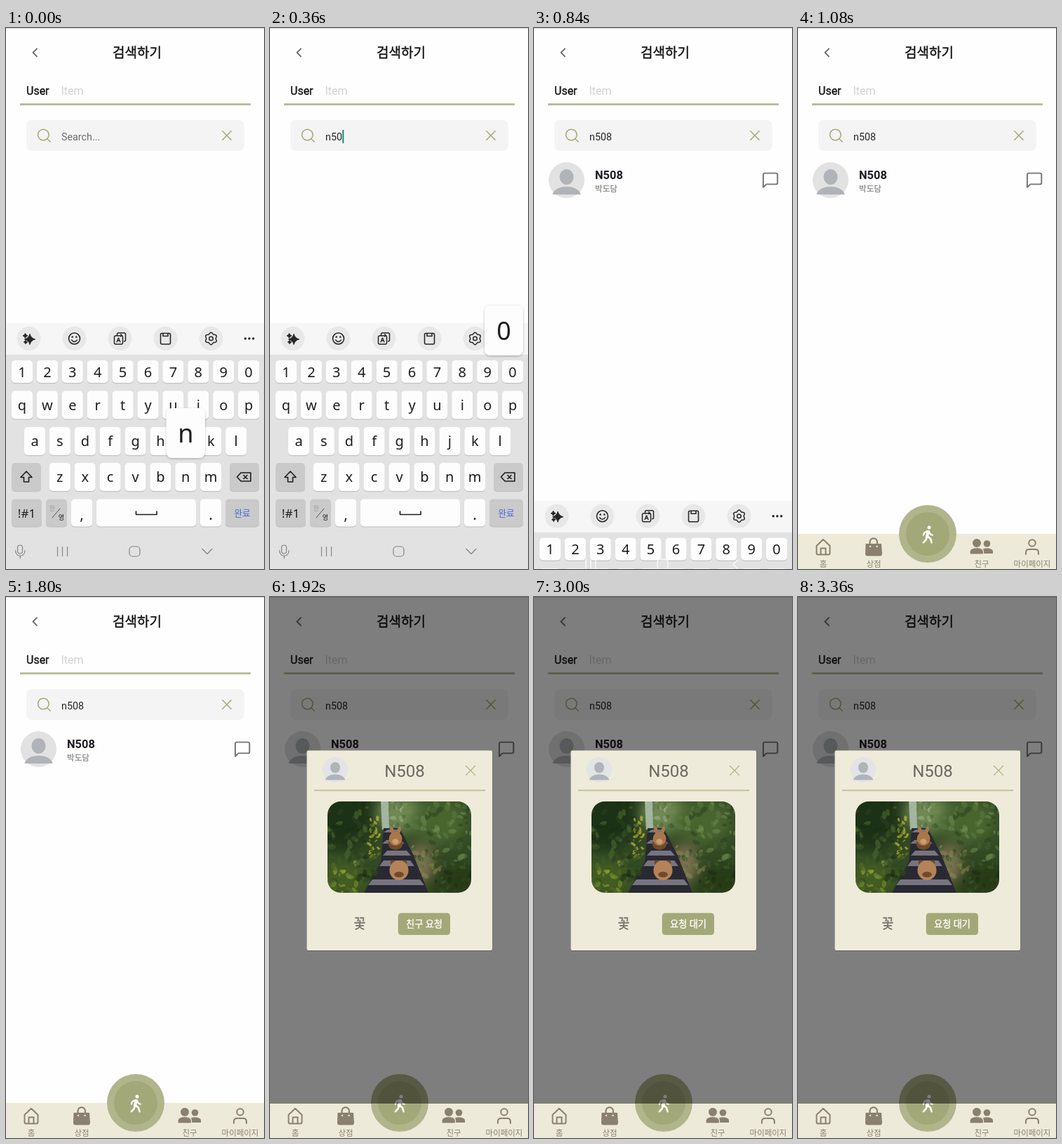
These frames come from a looping animation (368x770 px, 3600 ms). An HTML page:

```html
<!DOCTYPE html>
<html lang="ko">
<head>
<meta charset="utf-8">
<title>검색하기</title>
<style>
  html, body { margin: 0; width: 100%; height: 100%; overflow: hidden; background: #fefefe; }
  svg { display: block; width: 100%; height: 100%; }
  text { font-family: Roboto, "Noto Sans CJK KR", "Noto Sans CJK", sans-serif; }
  .key { font-family: "Noto Sans", "Noto Sans CJK KR", "Noto Sans CJK", sans-serif; }
</style>
</head>
<body>
<svg id="stage" viewBox="0 0 368 770" xmlns="http://www.w3.org/2000/svg"></svg>
<script>
const LOOP = 3600, STEP = 120;
const ID = 'n508', NAME = 'N508', REAL = '박도담';
const OLIVE = '#a3a878', CREAM = '#eeead9', TAUPE = '#8a8070';

// Markup helpers
const rect = (x, y, w, h, r, fill, more = '') =>
  `<rect x="${x}" y="${y}" width="${w}" height="${h}" rx="${r}" fill="${fill}" ${more}/>`;
const circle = (x, y, r, fill, more = '') => `<circle cx="${x}" cy="${y}" r="${r}" fill="${fill}" ${more}/>`;
const oval = (x, y, rx, ry, fill, more = '') =>
  `<ellipse cx="${x}" cy="${y}" rx="${rx}" ry="${ry}" fill="${fill}" ${more}/>`;
const shape = (d, fill, more = '') => `<path d="${d}" fill="${fill}" ${more}/>`;
const line = (d, color, w, more = '') =>
  `<path d="${d}" fill="none" stroke="${color}" stroke-width="${w}" stroke-linecap="round" stroke-linejoin="round" ${more}/>`;
const text = (x, y, size, fill, str, more = '') =>
  `<text x="${x}" y="${y}" font-size="${size}" fill="${fill}" ${more}>${str}</text>`;
const label = (x, y, size, fill, str, more = '') =>
  text(x, y, size, fill, str, 'text-anchor="middle" ' + more);
const group = (id, body, more = '') => `<g id="${id}" ${more}>${body}</g>`;
const medium = color => `stroke="${color}" stroke-width=".35"`;
const cross = (x, y, r, color, w) =>
  line(`M${x - r} ${y - r}l${2 * r} ${2 * r}m0 ${-2 * r}l${-2 * r} ${2 * r}`, color, w);

function random(seed) {
  return () => (seed = (seed * 16807) % 2147483647) / 2147483647;
}

function avatar(x, y, r, back, front) {
  const k = r / 25.5;
  return `<g transform="translate(${x} ${y}) scale(${k})">` + circle(0, 0, 25.5, back) +
    oval(0, -4.5, 10, 11, front) + shape('M-20 20.5C-17 5.5 17 5.5 20 20.5Z', front) + '</g>';
}

function page() {
  return rect(0, 0, 368, 770, 0, '#fefefe') + rect(0, 0, 368, 1, 0, '#d2d2d2') +
    line('M44 29.5L38.5 35L44 40.5', '#6e6e6e', 1.8) +
    label(187, 42, 19, '#111', '검색하기', medium('#111')) +
    text(29, 95, 16, '#141414', 'User', medium('#141414')) +
    text(78.5, 95, 16, '#d2d2d2', 'Item') +
    rect(20, 107.3, 329, 2.8, 0, '#b7ba95') +
    rect(29, 131, 311, 44, 8, '#f4f4f4') +
    circle(53.3, 152, 7.8, 'none', 'stroke="#a9a876" stroke-width="1.6"') +
    line('M59 158L63.2 162', '#a9a876', 1.6) + cross(315, 153, 6.2, '#a9a876', 1.5) +
    text(79, 160, 14.3, '#6c6c6c', '', 'id="query"') +
    rect(103.5, 145, 2, 19, 0, '#16897b', 'id="caret"');
}

const result = () => group('result',
  avatar(46.5, 216.5, 25.5, '#e2e2e2', '#b0b3b8') +
  text(87, 215, 16.4, '#1f1a24', NAME, 'font-weight="700"') +
  text(87, 232.5, 11.6, '#9a9a9a', REAL, 'font-weight="700"') +
  line('M21 15a2 2 0 0 1-2 2H7l-4 4V5a2 2 0 0 1 2-2h14a2 2 0 0 1 2 2z', '#747474', 1.7,
    'transform="translate(323.6 203.2) scale(1.13)"'));

function tabBar() {
  const names = [[36, '홈'], [108, '상점'], [262, '친구'], [334, '마이페이지']];
  const walker = circle(187, 711, 2.5, '#fff') +
    line('M185.5 717L184 724', '#fff', 4.2) +
    line('M183.8 724.5L182.5 728.5L178.8 732.3M185 723.5L189 727L190.6 732.3', '#fff', 2.6) +
    line('M184.5 716L180.4 718L178.8 721.8M186.8 716.5L188.8 720.4L191.8 721.8', '#fff', 2.2);
  return group('tabs',
    rect(0, 720, 368, 50, 0, CREAM) +
    circle(185, 720, 41, '#b1b58b') + circle(185, 720, 31, OLIVE) + walker +
    line('M26.5 737L36 728L45.5 737V747.5Q45.5 749.5 43.5 749.5H28.5Q26.5 749.5 26.5 747.5ZM32.5 749V740.5H39.5V749', TAUPE, 2) +
    shape('M96.5 734H119L120 748Q120 751.5 117 751.5H99Q96 751.5 96 748Z', TAUPE) +
    line('M102.5 737V732C102.5 724.5 113 724.5 113 732V737', TAUPE, 2.2) +
    circle(103, 738, 1.2, CREAM) + circle(112.6, 738, 1.2, CREAM) +
    circle(269.5, 734, 4.8, TAUPE) + shape('M261 748V745C261 739 278 739 278 745V748Z', TAUPE) +
    shape('M245 749V745C245 738 264.5 738 264.5 745V749Z', TAUPE, `stroke="${CREAM}" stroke-width="1.2"`) +
    circle(255, 733, 6, TAUPE) +
    circle(334, 733, 4.8, 'none', `stroke="${TAUPE}" stroke-width="2"`) +
    line('M325 749V746.5Q325 742 329.5 742H338.5Q343 742 343 746.5V749', TAUPE, 2) +
    names.map(([x, s]) => label(x, 766.5, 11.5, TAUPE, s)).join(''));
}

// Keyboard
const pitch = 35.9, keys = {};
const rows = [['1234567890', 23, 473, 32], ['qwertyuiop', 23, 516.5, 40], ['asdfghjkl', 41, 568, 40], ['zxcvbnm', 76.8, 619, 40]];

function cap(x, y, w, h, fill = '#fdfdfd') {
  return rect(x, y + 1.3, w, h, 5, '#c3c3c5') + rect(x, y, w, h, 5, fill);
}

function toolIcons() {
  const ink = '#262626', at = (x, s) => `<g transform="translate(${x} 442)">${s}</g>`;
  const star = (x, y, r) => shape(`M${x} ${y - r}Q${x + r * .2} ${y - r * .2} ${x + r} ${y}Q${x + r * .2} ${y + r * .2} ${x} ${y + r}Q${x - r * .2} ${y + r * .2} ${x - r} ${y}Q${x - r * .2} ${y - r * .2} ${x} ${y - r}Z`, ink, `stroke="${ink}"`);
  let gear = '';
  for (let i = 0; i < 48; i++) {
    const a = i / 48 * Math.PI * 2, r = 7.7 + Math.cos(a * 6);
    gear += (i ? 'L' : 'M') + (r * Math.sin(a)).toFixed(2) + ' ' + (-r * Math.cos(a)).toFixed(2);
  }
  return [
    star(1.5, 1, 7.5) + star(-5, -4, 3.5) + star(-4.5, 5, 2.8),
    circle(0, 0, 8, 'none', `stroke="${ink}" stroke-width="1.6"`) + circle(-2.8, -2.2, 1.3, ink) +
      circle(2.8, -2.2, 1.3, ink) + line('M-4 2Q0 7 4 2', ink, 1.5),
    line('M-4-4V-6Q-4-8-2-8H6Q8-8 8-6V2Q8 4 6 4', ink, 1.5) + rect(-8, -4, 12, 12, 2, 'none', `stroke="${ink}" stroke-width="1.5"`) +
      line('M-4.5 5L-2-1L.5 5M-3.8 3H-.2M1-6L3-4.5L1-3', ink, 1.3),
    rect(-7, -7.5, 14, 15.5, 2, 'none', `stroke="${ink}" stroke-width="1.6"`) + line('M-3.5-7V-3.5H3.5V-7', ink, 1.6),
    line(gear + 'Z', ink, 1.5) + circle(0, 0, 2.8, 'none', `stroke="${ink}" stroke-width="1.5"`)
  ].map((s, i) => at(32.5 + 65 * i, circle(0, 0, 17, '#e8e8e8') + s)).join('') +
    [341.3, 347, 352.7].map(x => circle(x, 442, 1.7, ink)).join('');
}

function keyboard() {
  const ink = '#1d1d1d', grey = '#cacaca', nav = '#85858a', k = 'class="key"';
  let s = rect(0, 420, 368, 46, 0, '#f6f6f6') + rect(0, 465, 368, 305, 0, '#e2e2e2') + toolIcons();
  for (const [chars, x0, y, h] of rows)
    [...chars].forEach((c, i) => {
      const x = x0 + i * pitch;
      keys[c] = { x, y };
      s += cap(x - 15, y, 30, h) + label(x, y + h / 2 + (h < 40 ? 7.5 : 7), 20, ink, c, k);
    });
  s += cap(8, 619, 42, 40, grey) + cap(319, 619, 42, 40, grey) + cap(8, 670.5, 43, 39, grey) + cap(57, 670.5, 30, 39, grey) +
    cap(93, 670.5, 30, 39) + cap(129, 670.5, 142, 39) + cap(277, 670.5, 30, 39) + cap(313, 670.5, 48, 39, grey);
  s += line('M29 631L37 639.5H32.5V646H25.5V639.5H21Z', ink, 1.6) +
    line('M329.5 639L335 633H349V645H335ZM339 636.5l5 5m0-5l-5 5', ink, 1.6) +
    label(29.5, 697, 17, ink, '!#1', k) + label(66, 687, 9, '#999', '한') + label(79, 700, 9, ink, '영') +
    line('M66 697L77 684', '#555', 1) + label(108, 700, 21, ink, ',', k) + label(292, 700, 21, ink, '.', k) +
    line('M185.5 688V692.5H215V688', ink, 1.6) + label(337, 695, 12.6, '#4668d8', '완료');
  s += rect(16.5, 736, 7, 12, 3.5, 'none', `stroke="${nav}" stroke-width="1.2"`) +
    line('M13.5 743.5C13.5 754 27 754 27 743.5M20.2 751.5V755', nav, 1.2);
  return group('keyboard', s + group('keyNav',
    line('M73.5 738.5V751.5M80.5 738.5V751.5M87.5 738.5V751.5', nav, 1.2) +
    rect(176, 738, 15, 14, 4.5, 'none', `stroke="${nav}" stroke-width="1.2"`) +
    line('M280 741.5L287 748.5L294 741.5', nav, 1.3)));
}

const popup = () => group('popup',
  rect(-27.5, -78, 55, 71, 8, '#fdfdfd', 'filter="url(#soft)"') +
  label(0, -29, 36, '#1d1d1d', '', 'class="key" id="popChar"'));

const homeNav = () => group('homeNav',
  line('M74 756V770M81 756V770M88 756V770M291 757L284 763.5L291 770', '#fafafa', 1.3) +
  rect(176, 756, 15, 14, 4.5, 'none', 'stroke="#fafafa" stroke-width="1.3"'));

// Garden path, painted with soft flat shapes in a 205 x 130 box
function photo() {
  const rnd = random(77);
  const leaves = (n, x, y, w, h, size, tones) => {
    let s = '';
    for (let i = 0; i < n; i++) {
      const px = (x + rnd() * w).toFixed(1), py = (y + rnd() * h).toFixed(1), r = size * (.5 + rnd());
      s += oval(px, py, r.toFixed(1), (r * .55).toFixed(1), tones[Math.floor(rnd() * tones.length)],
        `opacity=".6" transform="rotate(${Math.floor(rnd() * 180)} ${px} ${py})"`);
    }
    return s;
  };
  const glow = (x, y, rx, ry, color) => oval(x, y, rx, ry, color, 'filter="url(#haze)"');

  const woods = rect(0, 0, 205, 130, 0, '#334a25') +
    glow(20, 20, 48, 50, '#1f3217') + glow(104, 18, 34, 26, '#6f8852') + glow(160, 30, 40, 30, '#48652f') +
    glow(185, 112, 45, 25, '#263a19') + glow(22, 108, 36, 24, '#425c22') + glow(134, 88, 19, 28, '#7b7150') +
    leaves(70, -5, -5, 78, 95, 5, ['#1b2d13', '#2a401c', '#3c5728', '#4a6830']) +
    leaves(80, 112, -5, 98, 90, 5, ['#2c4520', '#425f2d', '#587840', '#6b874c']) +
    leaves(22, 82, -4, 34, 42, 4, ['#4c6738', '#7e9863', '#9fb386']) +
    shape('M76 0H87L88 40H78Z', '#a3b5a0') +
    leaves(30, 118, 62, 42, 46, 4, ['#8c7f5b', '#665d40', '#5b6d3a', '#75804a']) +
    leaves(24, 150, 88, 58, 44, 5, ['#1b2b12', '#2e4720', '#40592b']);

  let steps = shape('M80 38H103L122 75L144 130H52L76 86Z', '#292a31');
  for (const [x, y, w, h] of [[80, 40, 25, 4], [78, 55, 32, 5], [79, 70, 40, 7], [74, 84, 50, 8], [58, 111, 80, 8]])
    steps += shape(`M${x} ${y + h}L${x + 6} ${y}H${x + w - 6}L${x + w} ${y + h}Z`, '#777582');

  const flowers =
    leaves(36, 58, 24, 17, 58, 2.6, ['#c8b92d', '#9da02f', '#63782b', '#d9c941']) +
    leaves(34, -4, 88, 46, 44, 4, ['#748f2c', '#98a637', '#4e6d25', '#2f481a']) +
    leaves(24, 42, 78, 28, 34, 4, ['#1c2b14', '#2f461f', '#47602b']);

  const fur = '#a9774a', deep = '#6f4a2c';
  const pets = oval(92, 41, 2.6, 6, fur, 'transform="rotate(-15 92 41)"') +
    oval(102, 41, 2.6, 6, fur, 'transform="rotate(15 102 41)"') +
    oval(97, 60, 10.5, 9, deep) + oval(97, 53, 9.5, 10, fur) + oval(97, 57, 4.5, 4, '#c99f72') +
    circle(93, 87, 3.5, deep) + circle(110, 87, 3.5, deep) +
    oval(102, 98, 13.5, 14, '#b5835a') + oval(102, 104, 7, 4, deep);

  return `<g transform="translate(82 291)" clip-path="url(#frame)"><g filter="url(#blur)">` +
    woods + steps + flowers + '</g>' + pets + '</g>';
}

const modal = () => group('modal',
  rect(0, 0, 368, 721, 0, '#000', 'opacity=".5"') +
  rect(52.5, 219.5, 264.5, 284.5, 2, '#4c4c46', 'opacity=".6"') + rect(52.5, 218.5, 264.5, 284.5, 2, '#efebda') +
  avatar(93, 246, 18, '#e3e4e6', '#b1b3bb') +
  label(192, 256, 24, '#6c6961', NAME) + cross(286, 247, 6.5, '#b7af86', 1.2) +
  rect(63, 274.4, 244, 1.8, 0, '#c3bc93') + photo() +
  label(128, 472, 19, '#77736b', '꽃', medium('#77736b')) +
  group('button', rect(182.7, 449.8, 74.3, 31.2, 4.5, OLIVE) +
    label(220, 469.5, 13.2, '#fff', '', 'id="action" ' + medium('#fff'))));

const stage = document.getElementById('stage');
stage.innerHTML = `<defs><clipPath id="frame"><rect width="205" height="130" rx="19"/></clipPath>
  <filter id="blur"><feGaussianBlur stdDeviation=".7"/></filter>
  <filter id="haze" x="-50%" y="-50%" width="200%" height="200%"><feGaussianBlur stdDeviation="9"/></filter>
  <filter id="soft" x="-20%" y="-20%" width="140%" height="140%"><feDropShadow dx="0" dy="1" stdDeviation="1.6" flood-opacity=".28"/></filter></defs>` +
  page() + result() + tabBar() + keyboard() + popup() + homeNav() + modal();

const el = id => document.getElementById(id);
const show = (id, on) => el(id).setAttribute('display', on ? 'inline' : 'none');
const smooth = p => (p = Math.min(1, Math.max(0, p)), p * p * (3 - 2 * p));

function draw(time) {
  const t = Math.floor((time % LOOP) / STEP) * STEP;

  const typed = ID.slice(0, Math.min(4, t / STEP));
  el('query').textContent = typed || 'Search...';
  el('query').setAttribute('fill', typed ? '#262626' : '#6c6c6c');
  show('caret', typed && t < 720);
  el('caret').setAttribute('x', 79 + 8.1 * typed.length);

  const pressed = t === 0 ? ID[0] : t > STEP && t < 600 ? typed.slice(-1) : '';
  show('popup', pressed);
  if (pressed) {
    const { x, y } = keys[pressed];
    el('popChar').textContent = pressed;
    el('popup').setAttribute('transform', `translate(${Math.min(333.5, x)} ${y})`);
  }

  const drop = 350 * smooth((t - 620) / 337);
  el('keyboard').setAttribute('transform', `translate(0 ${drop})`);
  show('keyboard', drop < 350);
  show('homeNav', drop > 0 && drop < 350);
  show('keyNav', drop === 0);

  show('result', t >= 720);
  show('tabs', t >= 1080);
  show('modal', t >= 1920);
  el('button').setAttribute('opacity', t < 2640 ? 1 : .2 + .8 * smooth((t - 2640) / 240));
  el('action').textContent = t < 2880 ? '친구 요청' : '요청 대기';
}

const start = performance.now();
function tick() {
  draw(performance.now() - start);
  requestAnimationFrame(tick);
}
tick();
</script>
</body>
</html>
```
